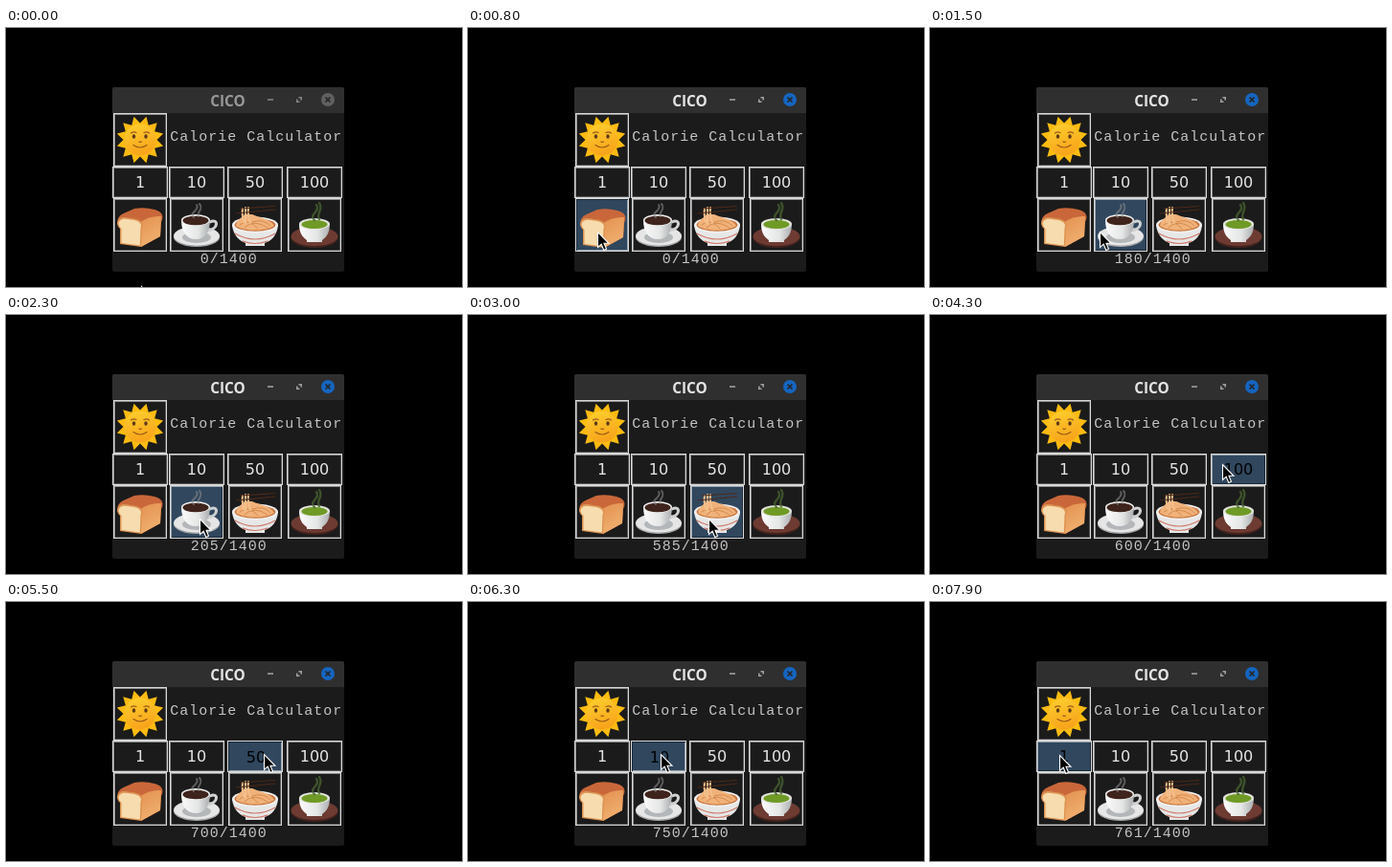
Animation, 476 px wide and 271 px high, one loop 8 s. Source, as an HTML page:

```html
<!DOCTYPE html>
<html lang="en">
<head>
<meta charset="utf-8">
<title>Calorie Calculator</title>
<style>
  html, body { margin: 0; width: 100%; height: 100%; overflow: hidden; background: #000; }
  svg { display: block; }
  .edge, .light, .dark, .face { shape-rendering: crispEdges; }
  .edge { fill: #d9d9d9; }
  .light { fill: #8d8d8d; }
  .dark { fill: #545454; }
  .face { fill: #1b1b1b; }
  .hover .light { fill: #97a3ae; }
  .hover .dark { fill: #1c2a38; }
  .hover .face { fill: #30475e; }
  .press .light { fill: #1c2a38; }
  .press .dark { fill: #97a3ae; }
  .press .content { transform: translate(1px, 1px); }
  .num { font: 16px "DejaVu Sans", sans-serif; fill: #e6e6e6; text-anchor: middle; }
  .hover .num { fill: #000; }
  .mono { font: 15px "Liberation Mono", monospace; letter-spacing: 1px; fill: #c4c4c4; }
  .title { font: bold 15.4px "Open Sans", sans-serif; fill: #989898; text-anchor: middle; }
  .close { fill: #606060; }
  .ctl { fill: none; stroke: #858585; stroke-width: 1.6; }
  .focus .title { fill: #e4e4e4; }
  .focus .close { fill: #1565c0; }
  .focus .ctl { stroke: #a0a0a0; }
  .line { fill: none; stroke-linecap: round; }
</style>
</head>
<body>
<svg width="476" height="271" viewBox="0 0 476 271">
  <defs>
    <linearGradient id="sunFill" x2=".3" y2="1">
      <stop stop-color="#fdd02f"/><stop offset="1" stop-color="#f8a51b"/>
    </linearGradient>
    <linearGradient id="loaf" x2=".4" y2="1">
      <stop stop-color="#e39150"/><stop offset="1" stop-color="#f0b070"/>
    </linearGradient>
    <linearGradient id="china">
      <stop stop-color="#fafafa"/><stop offset=".6" stop-color="#e4e5e5"/><stop offset="1" stop-color="#a9acae"/>
    </linearGradient>

    <g id="bread">
      <path d="M2 24C0 17 5 14 10 12L19 8Q29 6 40 9C49 11 50 17 47 22L46 37 26 48Z" fill="#c9673a"/>
      <path d="M25 22Q36 15 47 16L46 37 26 48Z" fill="url(#loaf)"/>
      <path d="M1 24C1 16 9 16 15 18 23 18 30 22 27 28L26 48 4 45V29Q2 28 1 24Z" fill="#dc9252"/>
      <path d="M2.500 24C3 18 9 18 15 19.500 22 20 28 23 25.500 28L24.800 46.500 5.500 44V29Q3 27 2.500 24Z" fill="#f6dcae"/>
    </g>

    <g id="coffee">
      <ellipse cx="25" cy="38" rx="24" ry="10" fill="#a3a6a8"/>
      <ellipse cx="25" cy="36.500" rx="24" ry="10" fill="#e6e6e6"/>
      <ellipse cx="25" cy="38" rx="15" ry="6" fill="#b4b7b9"/>
      <path class="line" d="M39 22C48 18 48 29 37 31" stroke="#cfd1d2" stroke-width="3"/>
      <path d="M9 20C9 32 14 40 24 40S39 32 39 20Z" fill="url(#china)"/>
      <ellipse cx="24" cy="20" rx="15" ry="6" fill="#f0f0f0"/>
      <ellipse cx="24" cy="20.500" rx="13.500" ry="4.800" fill="#3e241c"/>
      <path class="line" d="M22 17C16 12 29 10 25 4M27 16C24 12 33 9 28 3" stroke="#8a8a8a" stroke-width="2" opacity=".6"/>
    </g>

    <g id="noodles">
      <path d="M1 25C2 36 9 42 15 44V47H35V44C42 42 48 36 49 25Z" fill="#e6e7e7"/>
      <path class="line" d="M4 34Q25 46 46 34M12 42Q25 47 38 42" stroke="#cf7766" stroke-width="1.100"/>
      <ellipse cx="25" cy="25" rx="24" ry="8.500" fill="#f1f1f1"/>
      <ellipse cx="25" cy="25" rx="21.500" ry="6.800" fill="#c9773f"/>
      <path d="M5 26C6 19 11 18 14 14H22C28 17 41 19 45 26 36 32 13 32 5 26Z" fill="#f0b27a"/>
      <path class="line" d="M9 25Q18 17 28 29M14 28Q23 18 38 28M22 22Q34 18 41 26" stroke="#d58a4d"/>
      <path class="line" d="M12 8Q11 14 13 22M15 7V24M18 7Q17 14 20 23" stroke="#f3c08c" stroke-width="2"/>
      <path d="M5 13L46 9M9 8L46 5.500" stroke="#4d2817" stroke-width="1.200"/>
    </g>

    <g id="tea">
      <ellipse cx="25" cy="38.500" rx="24.500" ry="10.500" fill="#43221d"/>
      <ellipse cx="25" cy="37" rx="24.500" ry="10" fill="#6d3b32"/>
      <path d="M9 24C9 34 13 38 17 41V43H33V41C37 38 41 34 41 24Z" fill="url(#china)"/>
      <ellipse cx="25" cy="24" rx="16" ry="6" fill="#e2e4dc"/>
      <ellipse cx="25" cy="24.500" rx="13.500" ry="4.500" fill="#6f9a26"/>
      <path class="line" d="M25 20C18 14 32 11 27 4M30 19C26 13 35 9 30 2" stroke="#46602f" stroke-width="2.400" opacity=".8"/>
    </g>

    <g id="sun">
      <polygon id="rays" fill="#fdbb12"/>
      <circle cx="25" cy="25" r="16.500" fill="url(#sunFill)"/>
      <g fill="#5d3a1a">
        <ellipse cx="18.500" cy="21.500" rx="1.700" ry="2.200"/>
        <ellipse cx="31" cy="21.500" rx="1.700" ry="2.200"/>
      </g>
      <path class="line" d="M15.500 18Q18 16 21 17.500M29 17.500Q32 16 34.500 18M18 30.500Q25 35.500 32 30.500M24 27Q25 28 26.500 27" stroke="#9a5a1b" stroke-width="1.200"/>
    </g>
  </defs>

  <rect x="111" y="62" width="242" height="193" rx="2" fill="#1b1b1b"/>
  <path d="M111 89V64Q111 62 113 62H351Q353 62 353 64V89Z" fill="#2f2f2f"/>
  <g id="bar">
    <text class="title" x="231.500" y="82">CICO</text>
    <path class="ctl" d="M273 75H279"/>
    <path class="ctl" d="M305.500 72.800H308.200V75.500M303.800 74.500V77.200H306.500"/>
    <circle class="close" cx="336" cy="75" r="7"/>
    <path d="M333.500 72.500L338.500 77.500M338.500 72.500L333.500 77.500" stroke="#252525" stroke-width="1.700"/>
  </g>
  <text class="mono" x="171.300" y="118">Calorie Calculator</text>
  <g id="buttons"></g>
  <text class="mono" id="count" y="246"></text>
  <path id="cursor" d="M.5 .5V16.500L4.200 13.200 6.800 19.500 9.500 18.300 7 12.300H12Z" stroke="#fff" stroke-width="1.100"/>
</svg>
<script>
  const LOOP = 8000, STEP = 100, HOLD = 200, GOAL = 1400;
  const $ = id => document.getElementById(id);

  const iconButton = (x, y, icon, add) => ({ x, y, w: 56, h: 56, icon, add });
  const buttons = [
    iconButton(112, 89, 'sun', 0),
    ...[[112, 'bread', 180, 1], [171, 'coffee', 25, 10], [232, 'noodles', 380, 50], [294, 'tea', 15, 100]]
      .flatMap(([x, icon, kcal, add]) => [
        { x: x - 1, y: 145, w: 58, h: 33, add },
        iconButton(x, 178, icon, kcal),
      ]),
  ];

  // Pointer stops; each move sets off one step after the last release.
  const entry = { x: 141, y: 270, press: -HOLD };
  const stops = [
    [135, 213, 400, 800], [177, 213, 1500, 1900],
    [251, 213, 2500, 2800], [312, 210, 3400, 3700],
    [305, 156, 4300, 4700], [269, 159, 5300, 5500],
    [201, 159, 6100, 6300], [135, 160, 6800, 7100],
  ].map(([x, y, arrive, press]) => ({ x, y, arrive, press }));
  stops.forEach((s, i) => {
    s.from = stops[i - 1] || entry;
    s.start = s.from.press + HOLD + STEP;
  });

  const buttonAt = ({ x, y }) => buttons.find(b =>
    x >= b.x && x < b.x + b.w && y >= b.y && y < b.y + b.h);

  function pointerAt(t) {
    const s = stops.filter(s => s.start <= t).pop();
    if (!s) return entry;
    const k = Math.min(1, (t - s.start) / (s.arrive - s.start));
    const mix = (a, b) => Math.round(a + (b - a) * k);
    return { x: mix(s.from.x, s.x), y: mix(s.from.y, s.y) };
  }

  const rect = (cls, x, y, w, h) =>
    `<rect class="${cls}" x="${x}" y="${y}" width="${w}" height="${h}"/>`;

  function buttonMarkup({ x, y, w, h, icon, add }) {
    const content = icon
      ? `<use href="#${icon}" x="${x + 3}" y="${y + 3}"/>`
      : `<text class="num" x="${x + w / 2}" y="${y + 22}">${add}</text>`;
    return `<g>${rect('edge', x, y, w, h)}${rect('light', x + 1, y + 1, w - 2, h - 2)}` +
      `${rect('dark', x + 2, y + 2, w - 3, h - 3)}${rect('face', x + 2, y + 2, w - 4, h - 4)}` +
      `<g class="content">${content}</g></g>`;
  }

  $('rays').setAttribute('points', Array.from({ length: 24 }, (_, i) => {
    const a = (i + 1) * Math.PI / 12 - Math.PI / 2, r = i % 2 ? 17.5 : 25;
    return `${25 + r * Math.cos(a)},${25 + r * Math.sin(a)}`;
  }).join(' '));
  $('buttons').innerHTML = buttons.map(buttonMarkup).join('');
  buttons.forEach((b, i) => { b.el = $('buttons').children[i]; });

  function draw(t) {
    const p = pointerAt(t), over = buttonAt(p);
    const down = stops.some(s => t >= s.press && t < s.press + HOLD);
    const total = stops.filter(s => s.press + HOLD <= t)
      .reduce((sum, s) => sum + buttonAt(s).add, 0);

    for (const b of buttons)
      b.el.setAttribute('class', b !== over ? '' : down ? 'hover press' : 'hover');
    $('bar').setAttribute('class', t >= stops[0].press ? 'focus' : '');

    const label = `${total}/${GOAL}`;
    $('count').textContent = label;
    $('count').setAttribute('x', 232.7 - label.length * 5);
    $('cursor').setAttribute('transform', `translate(${p.x} ${p.y})`);
  }

  const begin = performance.now();
  function tick() {
    const t = (performance.now() - begin) % LOOP;
    draw(Math.floor(t / STEP) * STEP);
    requestAnimationFrame(tick);
  }
  tick();
</script>
</body>
</html>
```
